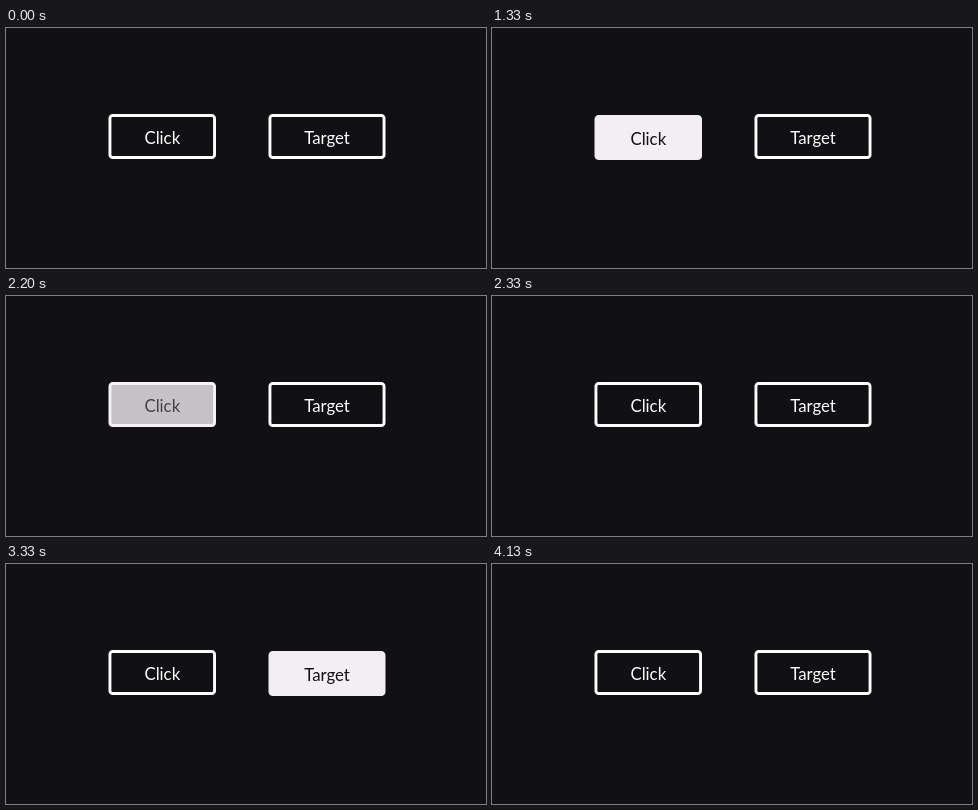
An HTML page for the animation above (4.39 s loop, 480 by 240 pixels).

```html
<!DOCTYPE html>
<html lang="en">
<head>
<meta charset="utf-8">
<title>Buttons</title>
<style>
  html, body { margin: 0; width: 100%; height: 100%; overflow: hidden; background: #111014; }
  svg { display: block; width: 100vw; height: 100vh; }
  rect { stroke-width: 2.9px; }
  text { font: 16.8px Lato, sans-serif; text-anchor: middle; }
</style>
</head>
<body>
<svg viewBox="0 0 480 240">
  <g id="click">
    <rect x="103.95" y="87.45" width="104.6" height="42.1" rx="2.8"/>
    <text x="156.3" y="115.5">Click</text>
  </g>
  <g id="target">
    <rect x="263.95" y="87.45" width="114.1" height="42.1" rx="2.8"/>
    <text x="321" y="115.5">Target</text>
  </g>
</svg>
<script>
const LOOP = 4390;
const DARK = [17, 16, 20], LIGHT = [242, 238, 242], WHITE = [255, 255, 255];

// fill: [time, hover amount] steps; press: [down, up]
const buttons = [
  { id: "click", press: [1330, 1870],
    fill: [[0, 0], [930, 0.83], [1000, 1], [2200, 0.8], [2270, 0.06], [2330, 0]] },
  { id: "target", press: [3330, 3730],
    fill: [[0, 0], [2870, 0.43], [2930, 1], [4070, 0.2], [4130, 0]] }
].map(b => {
  const group = document.getElementById(b.id);
  return { ...b, group, box: group.querySelector("rect"), label: group.querySelector("text") };
});

const mix = (a, b, p) => `rgb(${a.map((v, i) => Math.round(v + (b[i] - v) * p))})`;
const stepAt = (steps, t) => steps.filter(s => s[0] <= t).pop()[1];

function draw(t) {
  for (const { group, box, label, press, fill } of buttons) {
    const p = stepAt(fill, t);
    const down = t >= press[0] && t < press[1];
    box.setAttribute("fill", mix(DARK, LIGHT, p));
    box.setAttribute("stroke", mix(WHITE, LIGHT, p));
    label.setAttribute("fill", mix(WHITE, DARK, p));
    group.setAttribute("transform", `translate(0 ${down ? 1 : 0})`);
  }
}

const start = performance.now();
function tick() {
  draw((performance.now() - start) % LOOP);
  requestAnimationFrame(tick);
}
tick();
</script>
</body>
</html>
```
